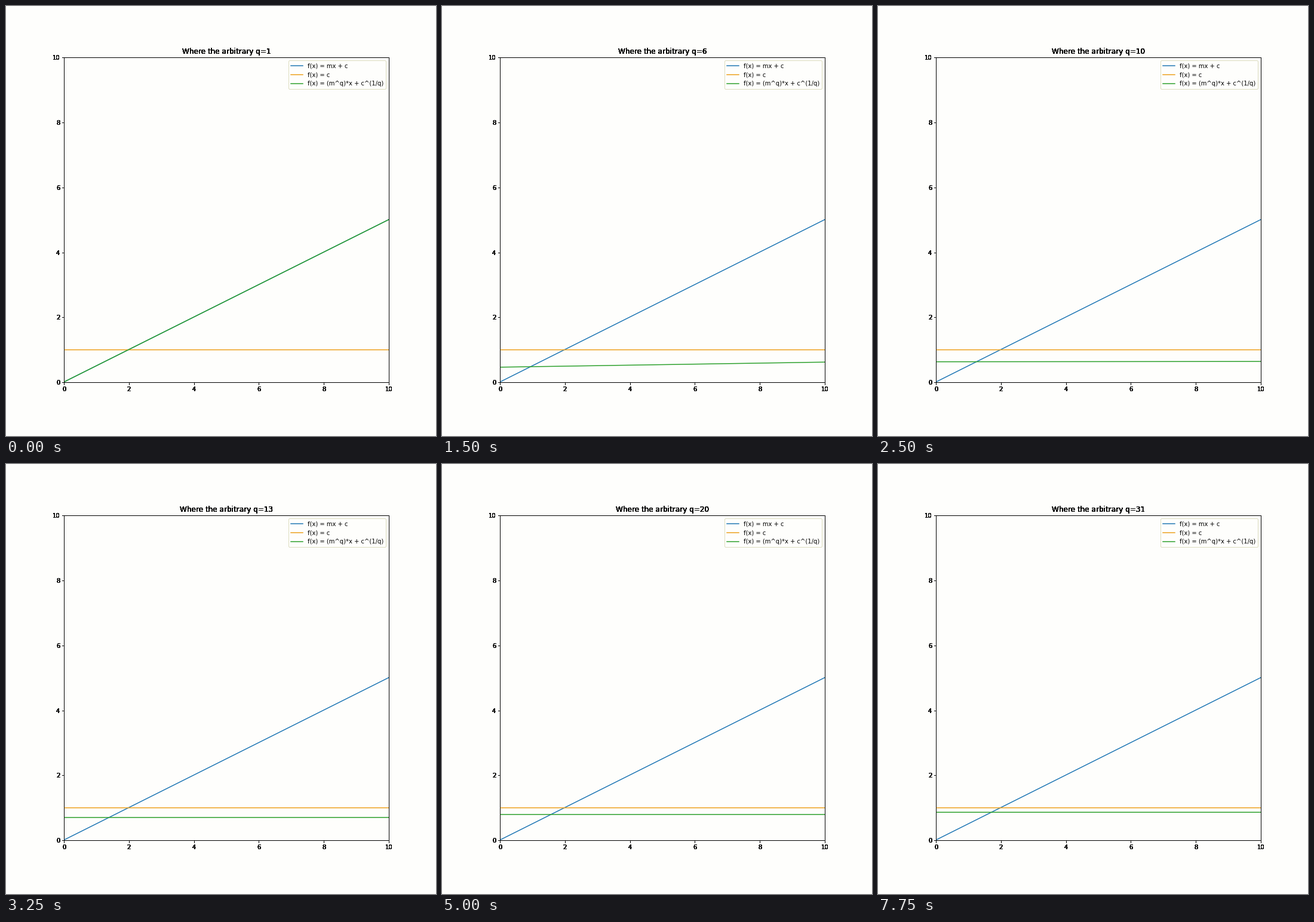
A matplotlib script for the animation above (8000 ms loop, 720x720 px).

```python
import numpy as np
import matplotlib.pyplot as plt
from matplotlib.animation import FuncAnimation

plt.rcParams.update({"font.family": "DejaVu Sans", "font.size": 10})

FRAMES, INTERVAL = 32, 250
BACKGROUND = "#fefefc"
BOX = [0.135, 0.125, 0.755, 0.755]
LAYERS = 8  # stacked axes give the text its heavy, hard edges
M, C = 0.5, 0.01

x = np.linspace(0, 10, 101)


def add_layer():
    ax = fig.add_axes(BOX, facecolor="none")
    ax.set(xlim=(0, 10), ylim=(0, 10))
    ax.set_xticks(range(0, 11, 2))
    ax.set_yticks(range(0, 11, 2))
    return ax


def add_line(y, color, label):
    line, = ax.plot(x, y, color=color, lw=1.5, label=label, snap=False)
    return line


def curve(q):
    return M ** q * x + C ** (1 / q)


fig = plt.figure(figsize=(10, 10), dpi=72, facecolor=BACKGROUND)
layers = [add_layer() for _ in range(LAYERS)]
ax = layers[-1]

add_line(M * x + C, "tab:blue", "f(x) = mx + c")
add_line(np.ones_like(x), "#eda01c", "f(x) = c")
moving = add_line(curve(1), "tab:green", "f(x) = (m^q)*x + c^(1/q)")
ax.legend(loc="upper right", facecolor=BACKGROUND, edgecolor="#d4d4b0")


def update(i):
    q = max(1, i)  # the first value is held for two steps
    moving.set_ydata(curve(q))
    titles = [layer.set_title(f"Where the arbitrary q={q}") for layer in layers]
    return [moving, *titles]


anim = FuncAnimation(fig, update, frames=FRAMES, interval=INTERVAL,
                     init_func=lambda: update(0), repeat=True, repeat_delay=0)
plt.show()
```
